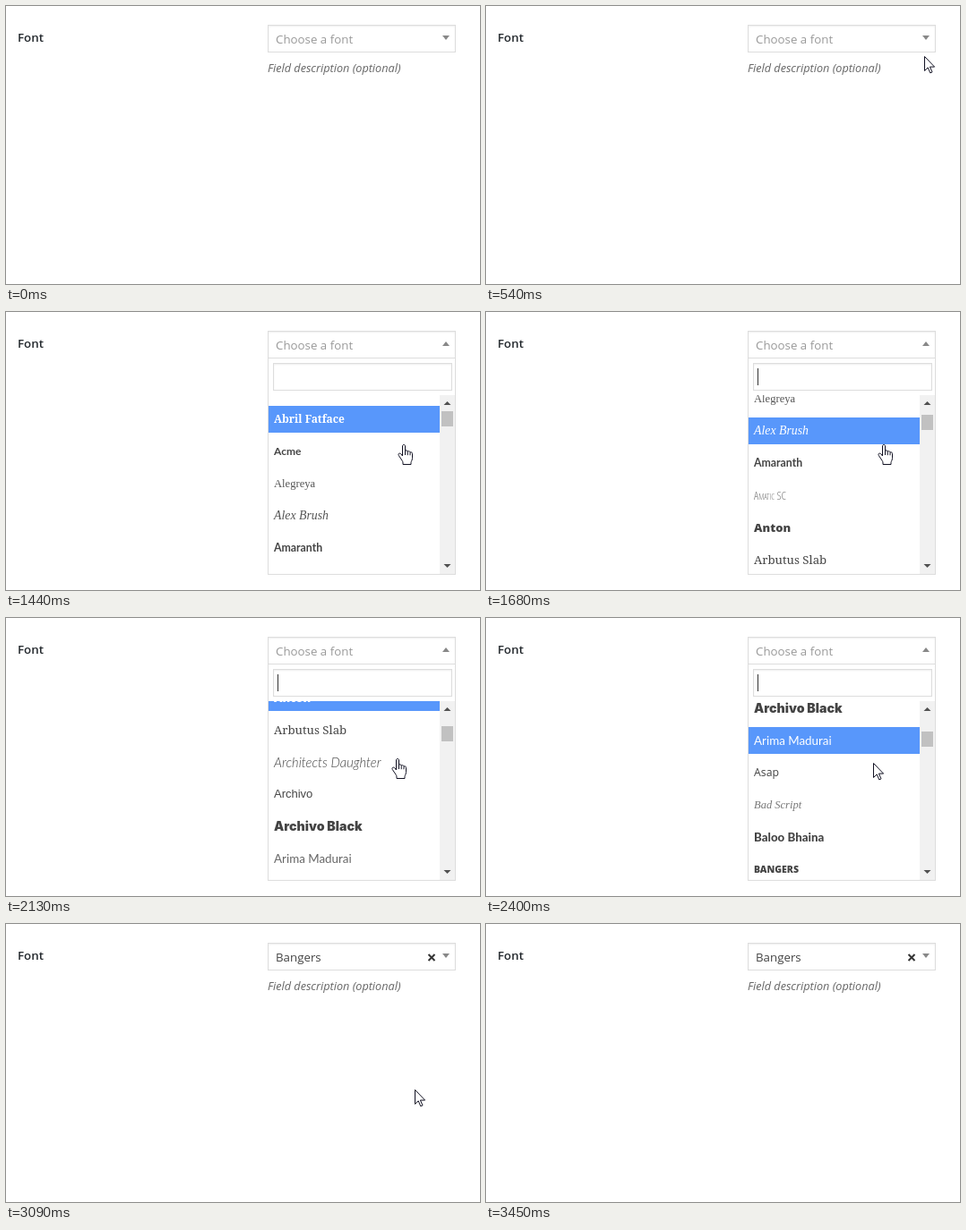
Write an HTML page that moves like this. It is 529 by 311 pixels and loops after 4890 ms.

```html
<!DOCTYPE html>
<html lang="en">
<head>
<meta charset="utf-8">
<title>Font picker</title>
<style>
html, body { margin: 0; width: 100%; height: 100%; overflow: hidden; background: #fff; }
#stage { position: relative; width: 529px; height: 311px; overflow: hidden; background: #fff; font: 13.3px/20px "Open Sans", sans-serif; color: #444; }
#stage * { box-sizing: border-box; }
#stage div, #stage svg { position: absolute; white-space: nowrap; }
#label { left: 13px; top: 25px; font-weight: 600; color: #23282d; }
#note { left: 292px; top: 59px; font-size: 12.7px; font-style: italic; color: #666; }
.box { border: 1px solid #ddd; background: #fff; box-shadow: inset 0 1px 2px rgba(0,0,0,.07); }
#select { left: 292px; top: 21px; width: 210px; height: 31px; }
#value { left: 301px; top: 27px; }
#value.empty { color: #999; }
#tri { left: 487px; top: 33px; }
#clear { left: 470px; top: 33px; }
#drop { left: 292px; top: 51px; width: 210px; height: 243px; border: 1px solid #ddd; background: #fff; }
#search { left: 5px; top: 5px; width: 200px; height: 31px; }
#caret { left: 10px; top: 11px; width: 1px; height: 19px; background: #333; }
#view { left: 0; top: 41px; width: 191px; height: 200px; overflow: hidden; }
#list { left: 0; top: 0; width: 191px; }
#list .row { width: 191px; height: 30px; padding-left: 6px; }
#list .row.on { background: #5897fb; color: #fff !important; }
#bar { left: 191px; top: 41px; width: 17px; height: 200px; background: #f1f1f1; }
#thumb { left: 2px; top: 17px; width: 13px; height: 17px; background: #c1c1c1; }
#bar svg { left: 0; top: 0; }
#cursor { left: 0; top: 0; overflow: visible; }
</style>
</head>
<body>
<div id="stage">
  <div id="label">Font</div>
  <div id="note">Field description (optional)</div>
  <div id="select" class="box"></div>
  <div id="value"></div>
  <svg id="clear" width="10" height="9"><path d="M1.5 1l7 7M8.5 1l-7 7" stroke="#333" stroke-width="2"/></svg>
  <svg id="tri" width="8" height="6"><path fill="#888"/></svg>
  <div id="drop">
    <div id="search" class="box"></div>
    <div id="caret"></div>
    <div id="view"><div id="list"></div></div>
    <div id="bar">
      <div id="thumb"></div>
      <svg width="17" height="200"><path id="up" d="M4.5 11l4-4 4 4z"/><path d="M4.5 189l4 4 4-4z" fill="#505050"/></svg>
    </div>
  </div>
  <svg id="cursor" width="20" height="26" fill="#fff" stroke="#112" stroke-linejoin="round">
    <path id="arrow" d="M.5.5v16l3.7-3.6 2.6 6 2.2-1-2.6-5.8h5.2z"/>
    <g id="hand" transform="translate(-6.5 0)">
      <path d="M6.5.5c-1 0-1.5.7-1.5 1.5v11l-1.5-2c-.8-1-2-1.2-2.7-.5-.5.5-.4 1.2 0 2l4 6c.5.8.7 1.5.7 2.5v1.5h9v-2c0-1 1.5-3 1.5-5v-5c0-1-.6-1.6-1.4-1.6-.6 0-1.1.3-1.1.3 0-1-.7-1.5-1.5-1.5-.7 0-1.3.4-1.3.4 0-.8-.7-1.3-1.4-1.3-.7 0-1.3.4-1.3.4V2c0-.8-.5-1.5-1.5-1.5z"/>
      <path d="M8 7v5M10.7 8.2v4M13.5 9.3v3" fill="none"/>
    </g>
  </svg>
</div>
<script>
const $ = id => document.getElementById(id);
const LOOP = 4890, STEP = 30, ENTER = 90, OPEN = 600, FOCUS = 1620, CLOSE = 3060, LEAVE = 3450;
const PITCH = 36, ROW = 30, LIST_TOP = 95, NOTCH = 100, GLIDE = 190;

// name, font, colour
const sans = '"Open Sans", sans-serif', lato = 'Lato, sans-serif';
const slab = '"Noto Serif", serif', serif = '"Liberation Serif", serif';
const fonts = [
  ['Abel', 'condensed 12.5px ' + sans],
  ['Abril Fatface', '900 12px ' + slab],
  ['Acme', '700 12px ' + lato],
  ['Alegreya', '12.6px ' + serif, '#555'],
  ['Alex Brush', 'italic 13.8px ' + serif, '#555'],
  ['Amaranth', '700 12.3px ' + lato],
  ['Amatic SC', 'small-caps 300 condensed 13px ' + sans, '#777'],
  ['Anton', '800 condensed 13px ' + sans],
  ['Arbutus Slab', '13.2px ' + slab],
  ['Architects Daughter', 'italic 300 14.7px ' + lato],
  ['Archivo', '13px "Liberation Sans", sans-serif'],
  ['Archivo Black', '900 14.2px Inter, sans-serif'],
  ['Arima Madurai', '13.4px ' + lato, '#666'],
  ['Asap', '12.3px ' + sans],
  ['Bad Script', 'italic 12.5px ' + serif, '#777'],
  ['Baloo Bhaina', '800 13.3px ' + lato],
  ['BANGERS', '800 condensed 10.5px ' + sans],
  ['Berkshire Swash', '700 12.8px ' + serif],
  ['Bitter', '13px ' + slab],
  ['Boogaloo', '700 condensed 11px ' + sans]
];
const rows = fonts.map(([name, font, color = '#444'], i) => {
  const row = document.createElement('div');
  row.className = 'row';
  row.textContent = name;
  Object.assign(row.style, { font, color, lineHeight: ROW + 'px', top: i * PITCH + 'px' });
  $('list').append(row);
  return row;
});

// pointer stops: time, x, y
const stops = [
  [90, 398, 291], [180, 514, 109], [330, 514, 109], [600, 482, 41], [1050, 482, 41],
  [1410, 444, 148], [1680, 444, 148], [2400, 432, 162], [2580, 428, 171], [2670, 425, 178],
  [2940, 425, 178], [3450, 532, 203]
];
const wheel = [1380, 1627, 2008, 2190, 2380];

const smooth = p => p * p * (3 - 2 * p);
const progress = (t, from, span) => Math.min(1, Math.max(0, (t - from) / span));
const sum = (list, f) => list.reduce((total, v) => total + f(v), 0);
const show = (id, on) => { $(id).style.visibility = on ? 'inherit' : 'hidden'; };

function pointer(t) {
  const n = Math.max(1, stops.findIndex(s => s[0] > t));
  const [t0, x0, y0] = stops[n - 1], [t1, x1, y1] = stops[n];
  const p = progress(t, t0, t1 - t0);
  return [Math.round(x0 + (x1 - x0) * p), Math.round(y0 + (y1 - y0) * p)];
}

function render(t) {
  const open = t >= OPEN && t < CLOSE, done = t >= CLOSE;
  show('drop', open);
  show('clear', done);
  $('value').textContent = done ? 'Bangers' : 'Choose a font';
  $('value').className = done ? '' : 'empty';
  $('tri').firstChild.setAttribute('d', open ? 'M0 5l4-5 4 5z' : 'M0 0h8l-4 5z');
  show('caret', t >= FOCUS && (t - FOCUS) % 1140 < 900);

  const scroll = Math.round(NOTCH * sum(wheel, w => smooth(progress(t, w, GLIDE))));
  $('list').style.transform = `translateY(${-scroll}px)`;
  $('thumb').style.transform = `translateY(${Math.floor(scroll * .0425)}px)`;
  $('up').setAttribute('fill', scroll ? '#505050' : '#a3a3a3');

  if (t < ENTER || t >= LEAVE) return show('cursor', false);
  // hover follows the list only once each glide has come to rest
  const [x, y] = pointer(t);
  const rest = NOTCH * sum(wheel, w => t >= w + GLIDE);
  const spot = y - LIST_TOP + rest;
  const active = Math.max(0, Math.floor(spot / PITCH));
  rows.forEach((row, i) => row.classList.toggle('on', i === active));

  const onSelect = y < 52 && x < 502;
  const onRow = open && y >= LIST_TOP && spot % PITCH < ROW;
  show('cursor', true);
  show('hand', onSelect || onRow);
  show('arrow', !onSelect && !onRow);
  $('cursor').style.transform = `translate(${x}px, ${y}px)`;
}

const start = performance.now();
function frame() {
  const t = (performance.now() - start) % LOOP;
  render(Math.floor(t / STEP) * STEP);
  requestAnimationFrame(frame);
}
frame();
</script>
</body>
</html>
```
